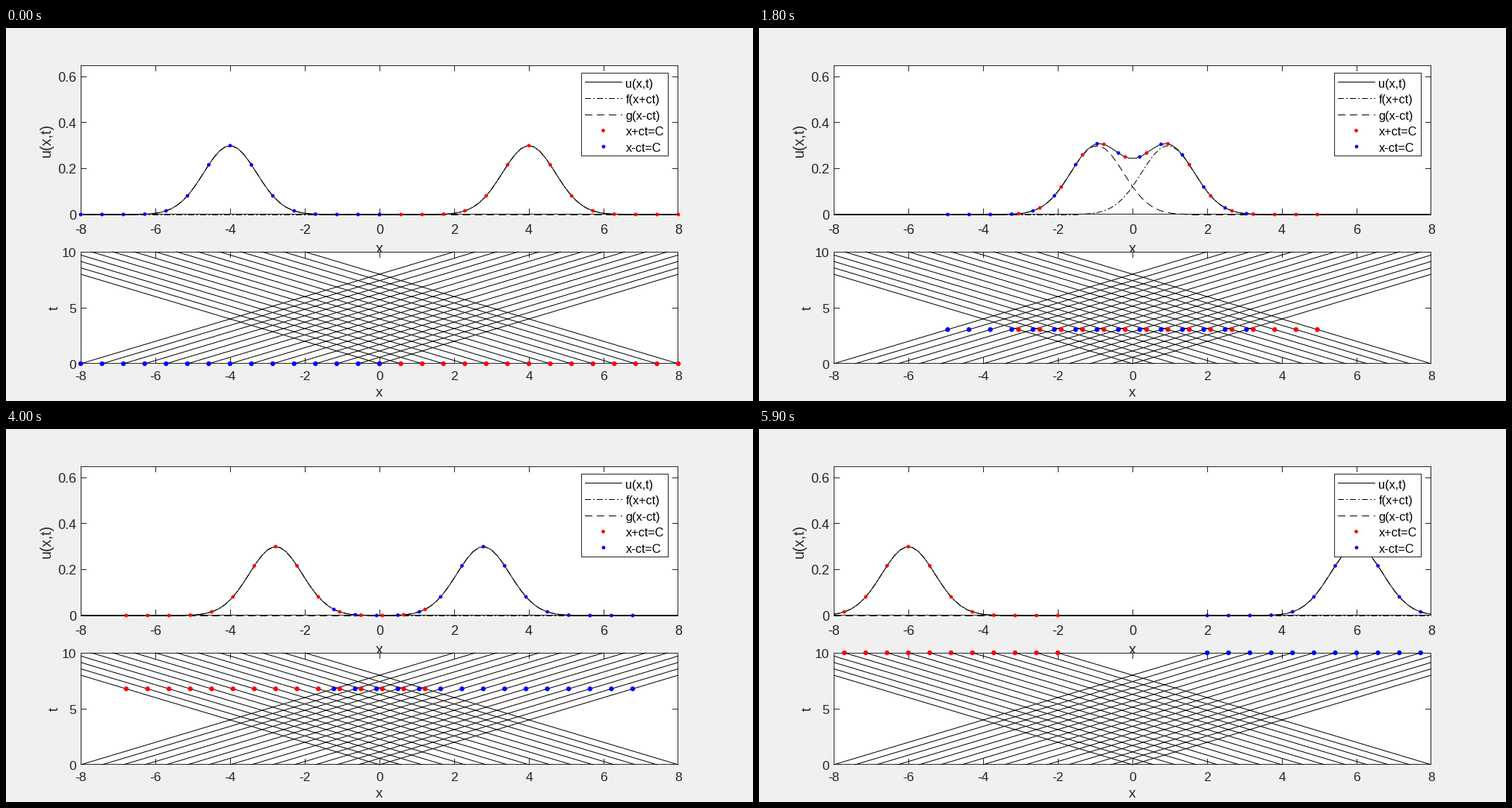
Animation, 1000 px wide and 500 px high, one loop 6000 ms. Source, as a matplotlib script:

```python
import numpy as np
import matplotlib.pyplot as plt
from matplotlib.animation import FuncAnimation
from matplotlib.collections import LineCollection, PolyCollection
from matplotlib.patches import Rectangle

# Two travelling waves u = f(x+ct) + g(x-ct) above their characteristics.
FRAMES, INTERVAL, T_END = 60, 100, 10
PX = 0.72  # one pixel in points at 100 dpi
INK = "#262626"
DASHDOT = (0, (8, 3, 2, 3))
DASHED = (0, (10, 6))

plt.rcParams["font.family"] = "Liberation Sans"
fig = plt.figure(figsize=(10, 5), dpi=100, facecolor="#f0f0f0")
ax = fig.add_axes([0, 0, 1, 1])
ax.set(xlim=(0, 1000), ylim=(500, 0))
ax.axis("off")


def px(x):
    return 500 + 50 * np.asarray(x)


def py_wave(u):
    return 250 - 200 * np.asarray(u) / 0.65


def py_time(t):
    return 450 - 15 * np.asarray(t)


def pulse(x):
    return 0.3 * np.exp(-x**2)


def left_going(x, t):
    return pulse(x + t - 4)


def right_going(x, t):
    return pulse(x - t + 4)


def wave(x, t):
    return left_going(x, t) + right_going(x, t)


def label(x, y, text, size, **kw):
    kw = {"ha": "center", "va": "baseline", "color": INK, **kw}
    ax.text(x, y, text, fontsize=size * PX, **kw)


def line(x, y, color="black", z=3, style="-"):
    # Pixel centres are given exactly, so snapping stays off.
    return ax.plot(x, y, color=color, lw=PX, ls=style, zorder=z, snap=False,
                   dash_capstyle="butt", solid_capstyle="butt")[0]


def box(x, y, w, h, z):
    ax.add_patch(Rectangle((x, y), w, h, fc="white", ec="none", zorder=z))
    left, right, top, bottom = x + .5, x + w - .5, y + .5, y + h - .5
    for row in (top, bottom):
        line([x, x + w], [row, row], INK, z + .1)
    for col in (left, right):
        line([col, col], [y, y + h], INK, z + .1)


def pixel_centre(value, last):
    return min(int(value), last - 1) + .5


def frame_axes(top, height, y_ticks, y_max, size, x_base, z):
    box(100, top, 800, height, z)
    bottom = top + height
    for i, value in enumerate(range(-8, 9, 2)):
        x = pixel_centre(100 + 100 * i, 900)
        line([x, x], [top, top + 8], INK, z + .1)
        line([x, x], [bottom - 8, bottom], INK, z + .1)
        label(100 + 100 * i, x_base, str(value), size, zorder=z)
    for value in y_ticks:
        exact = bottom - height * value / y_max
        y = pixel_centre(exact, bottom)
        line([100, 108], [y, y], INK, z + .1)
        line([892, 900], [y, y], INK, z + .1)
        label(94, exact + 7, f"{value:g}", size, ha="right", zorder=z)


def discs(xs, ys, diameter):
    a = np.linspace(0, 2 * np.pi, 32, endpoint=False)
    ring = diameter / 2 * np.column_stack([np.cos(a), np.sin(a)])
    return [ring + centre for centre in zip(xs, ys)]


def dot_layer(color, z):
    layer = PolyCollection([], facecolors=color, edgecolors="none", zorder=z)
    ax.add_collection(layer, autolim=False)
    return layer


# Static parts
frame_axes(50, 200, (0, 0.2, 0.4, 0.6), 0.65, 18, 275.5, 1)
label(500, 302, "x", 19.8, zorder=1)
label(60, 150, "u(x,t)", 19.8, rotation=90, rotation_mode="anchor")
frame_axes(300, 150, (0, 5, 10), 10, 17.5, 471.5, 2)
label(500, 494, "x", 19)
label(70, 375, "t", 19, rotation=90, rotation_mode="anchor")

blue_start = np.linspace(-8, 0, 15)
red_start = np.linspace(0, 8, 15)
rays = []
for start, direction in ((red_start, -1), (blue_start, 1)):
    for x0 in start:
        t1 = min(T_END, 8 - direction * x0)
        rays.append([(px(x0), py_time(0)),
                     (px(x0 + direction * t1), py_time(t1))])
ax.add_collection(LineCollection(rays, colors="black", linewidths=PX,
                                 zorder=3), autolim=False)

# Legend
box(770, 60, 117, 112, 8)
entries = ("u(x,t)", "f(x+ct)", "g(x-ct)", "x+ct=C", "x-ct=C")
for i, text in enumerate(entries):
    label(829.5, 80 + 21.5 * i, text, 16.2, ha="left", color="black", zorder=9)
for y, style in ((72.5, "-"), (94.5, DASHDOT), (116.5, DASHED)):
    line([775, 825], [y, y], z=9, style=style)
for color, x, y in (("red", 799.5, 137.5), ("blue", 800, 159)):
    dot_layer(color, 9).set_verts(discs([x], [y], 4.8))

# Moving parts
grid = np.linspace(-8, 8, 100)
curves = [(line([], [], style=s), fn) for s, fn in
          (("-", wave), (DASHDOT, left_going), (DASHED, right_going))]
families = [(red_start, -1, dot_layer("red", 5), dot_layer("red", 5)),
            (blue_start, 1, dot_layer("blue", 6), dot_layer("blue", 6))]


def update(i):
    t = T_END * i / (FRAMES - 1)
    for curve, fn in curves:
        u = fn(grid, t)
        # Flat stretches lie on a whole pixel row, just under the axis.
        curve.set_data(px(grid), np.where(u < 1e-3, 250.5, py_wave(u)))
    for start, direction, on_wave, on_ray in families:
        x = start + direction * t
        x = x[np.abs(x) <= 8 + 1e-9]
        on_wave.set_verts(discs(px(x), py_wave(wave(x, t)), 4.8))
        on_ray.set_verts(discs(px(x), np.full(x.size, py_time(t)), 6.4))
    return []


anim = FuncAnimation(fig, update, frames=FRAMES, interval=INTERVAL,
                     init_func=lambda: update(0), repeat=True, repeat_delay=0)
plt.show()
```
